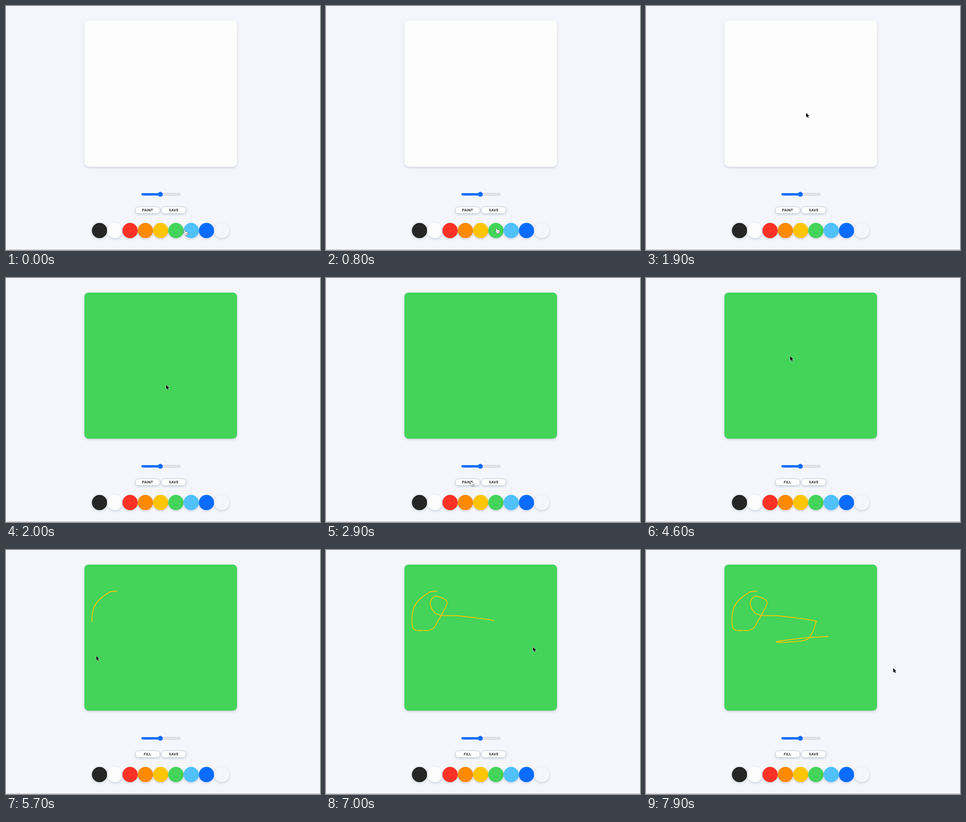
These frames come from a looping animation (600x468 px, 8 s). An HTML page with a canvas:

```html
<!DOCTYPE html>
<html lang="en">
<head>
<meta charset="utf-8">
<title>Paint board</title>
<style>
  html, body { margin: 0; width: 100%; height: 100%; overflow: hidden; background: #f4f6fb; }
  canvas { display: block; }
</style>
</head>
<body>
<canvas id="stage" width="600" height="468"></canvas>
<script>
const ctx = document.getElementById('stage').getContext('2d');
const LOOP = 8000, TICK = 100;
const FILL_AT = 2000, MODE_AT = 3000;
const BG = '#f4f6fb', WHITE = '#fdfdfe', GREEN = '#43d459', YELLOW = '#fdc400', BLUE = '#0a6cff';
const SWATCHES = ['#262626', WHITE, '#fd3126', '#ff8a00', YELLOW, GREEN, '#50c1fc', BLUE, BG];
const SWATCH = { x: 178.7, y: 430.7, gap: 29.2, r: 14.6 };
const BUTTON = { xs: [247, 297], y: 385, w: 47, h: 13 };
const BOARD = { x: 149.8, y: 28, w: 291.7, h: 280.2 };

// Key points of the drawing gesture, evenly spaced in time
const PEN = { start: 5325, step: 125, lag: 40, scaleX: 0.715, scaleY: 0.69 };
const GESTURE = [
  [212, 79], [195, 82.5], [169, 108], [166, 149], [188, 154.5], [204, 151],
  [214, 136], [223, 120], [231, 98.5], [208, 89], [199.5, 104], [213, 123.5],
  [255, 126.5], [319, 135], [323.5, 141], [317, 160], [304, 173], [262, 177],
  [251, 175.5], [305, 168.5], [358, 165.5], [390, 165]
];
const LAST = GESTURE.length - 1;

const toScreen = ([x, y]) => [
  BOARD.x + (x - BOARD.x) / PEN.scaleX,
  BOARD.y + (y - BOARD.y) / PEN.scaleY
];

// Pointer moves before drawing
const HOME = [339.5, 429.5];
const MOVES = [
  { from: 0, to: 600, at: [324, 426] },
  { from: 900, to: 1700, at: [306, 205] },
  { from: 2050, to: 2700, at: [275, 389] },
  { from: 3100, to: 3550, at: [291, 440] },
  { from: 3750, to: 4550, at: [275.5, 150] },
  { from: 4650, to: PEN.start, at: toScreen(GESTURE[0]) }
];

const clamp = (v, lo, hi) => Math.min(hi, Math.max(lo, v));
const ease = p => p * p * (3 - 2 * p);

// Catmull-Rom position along the gesture
function gestureAt(u) {
  const i = clamp(Math.floor(u), 0, LAST - 1), f = u - i;
  const [a, b, c, d] = [-1, 0, 1, 2].map(k => GESTURE[clamp(i + k, 0, LAST)]);
  return [0, 1].map(k => b[k] + f / 2 * (c[k] - a[k] +
    f * (2 * a[k] - 5 * b[k] + 4 * c[k] - d[k] + f * (3 * (b[k] - c[k]) + d[k] - a[k]))));
}

const penProgress = t => clamp((t - PEN.start) / PEN.step, 0, LAST);

function pointerAt(t) {
  if (t >= PEN.start) return toScreen(gestureAt(penProgress(t)));
  return MOVES.reduce((pos, { from, to, at }) => {
    const p = ease(clamp((t - from) / (to - from), 0, 1));
    return pos.map((v, k) => v + (at[k] - v) * p);
  }, HOME);
}

function withShadow(paint) {
  ctx.save();
  ctx.shadowColor = 'rgba(50,50,93,0.2)';
  ctx.shadowBlur = 4;
  ctx.shadowOffsetY = 1.7;
  paint();
  ctx.restore();
}

function box(x, y, w, h, r, fill, line) {
  ctx.beginPath();
  ctx.roundRect(x, y, w, h, r);
  ctx.fillStyle = fill;
  ctx.fill();
  if (line) {
    ctx.shadowColor = 'transparent';
    ctx.strokeStyle = line;
    ctx.lineWidth = 0.8;
    ctx.stroke();
  }
}

function disc(x, y, r, fill) {
  ctx.beginPath();
  ctx.arc(x, y, r, 0, Math.PI * 2);
  ctx.fillStyle = fill;
  ctx.fill();
}

function button(x, label) {
  const { y, w, h } = BUTTON;
  withShadow(() => box(x, y, w, h, 5.5, WHITE, '#c3c4ca'));
  ctx.font = '600 6.7px Inter, Arial, sans-serif';
  ctx.letterSpacing = '0.25px';
  ctx.textAlign = 'center';
  ctx.fillStyle = '#151515';
  ctx.fillText(label, x + w / 2, y + 9);
}

function slider() {
  box(259, 359.3, 74, 3.8, 1.9, '#ececef', '#b9bac0');
  box(258.8, 359, 37, 4.4, 2.2, BLUE);
  disc(295, 361.2, 4.6, BLUE);
}

// The line stops where the pointer leaves the board
function penLine(t) {
  const end = penProgress(t - PEN.lag);
  if (!end) return;
  ctx.save();
  ctx.beginPath();
  ctx.rect(BOARD.x, BOARD.y, 199, BOARD.h);
  ctx.clip();
  ctx.beginPath();
  for (let u = 0; u < end; u += 0.1) ctx.lineTo(...gestureAt(u));
  ctx.lineTo(...gestureAt(end));
  ctx.strokeStyle = YELLOW;
  ctx.lineWidth = 1.6;
  ctx.lineJoin = 'round';
  ctx.stroke();
  ctx.restore();
}

const ARROW = new Path2D('M0 0V8.2L1.9 6.5 3.2 9.5 4.7 8.9 3.4 6H5.9Z');
const HAND = new Path2D('M0 .8Q.9-.5 1.9.8L3.2 3.6Q4.2 2.8 4.8 3.7 5.8 3 6.3 4 7.5 3.5 7.8 4.9L8 7.5 7.2 10.3H3.2L.2 7.2Q-1 5.8.3 5.5L1.8 6.2Z');
const KNUCKLES = new Path2D('M3.8 6.6V8.6M5.2 6.6V8.6M6.5 6.6V8.6');

function isClickable(x, y) {
  const { xs, y: top, w, h } = BUTTON;
  const overButton = y >= top && y <= top + h && xs.some(left => x >= left && x <= left + w);
  return overButton || SWATCHES.some((_, i) =>
    Math.hypot(x - SWATCH.x - i * SWATCH.gap, y - SWATCH.y) < SWATCH.r + 1);
}

function pointer(x, y) {
  const hand = isClickable(x, y), shape = hand ? HAND : ARROW;
  ctx.save();
  ctx.translate(x, y);
  ctx.lineJoin = 'round';
  ctx.lineWidth = hand ? 0.9 : 1;
  ctx.strokeStyle = hand ? '#111' : '#fff';
  ctx.fillStyle = hand ? '#fff' : '#000';
  ctx.stroke(shape);
  ctx.fill(shape);
  if (hand) {
    ctx.lineWidth = 0.5;
    ctx.stroke(KNUCKLES);
  }
  ctx.restore();
}

function draw(t) {
  ctx.fillStyle = BG;
  ctx.fillRect(0, 0, 600, 468);
  ctx.fillStyle = '#bcbec3';
  ctx.fillRect(0, 467, 600, 1);

  const { x, y, w, h } = BOARD;
  withShadow(() => box(x, y, w, h, 8, t < FILL_AT ? WHITE : GREEN));
  penLine(t);
  slider();
  button(BUTTON.xs[0], t < MODE_AT ? 'PAINT' : 'FILL');
  button(BUTTON.xs[1], 'SAVE');
  SWATCHES.forEach((color, i) =>
    withShadow(() => disc(SWATCH.x + i * SWATCH.gap, SWATCH.y, SWATCH.r, color)));
  pointer(...pointerAt(t));
}

function loop() {
  draw(Math.floor(performance.now() % LOOP / TICK) * TICK);
  requestAnimationFrame(loop);
}
loop();
</script>
</body>
</html>
```
